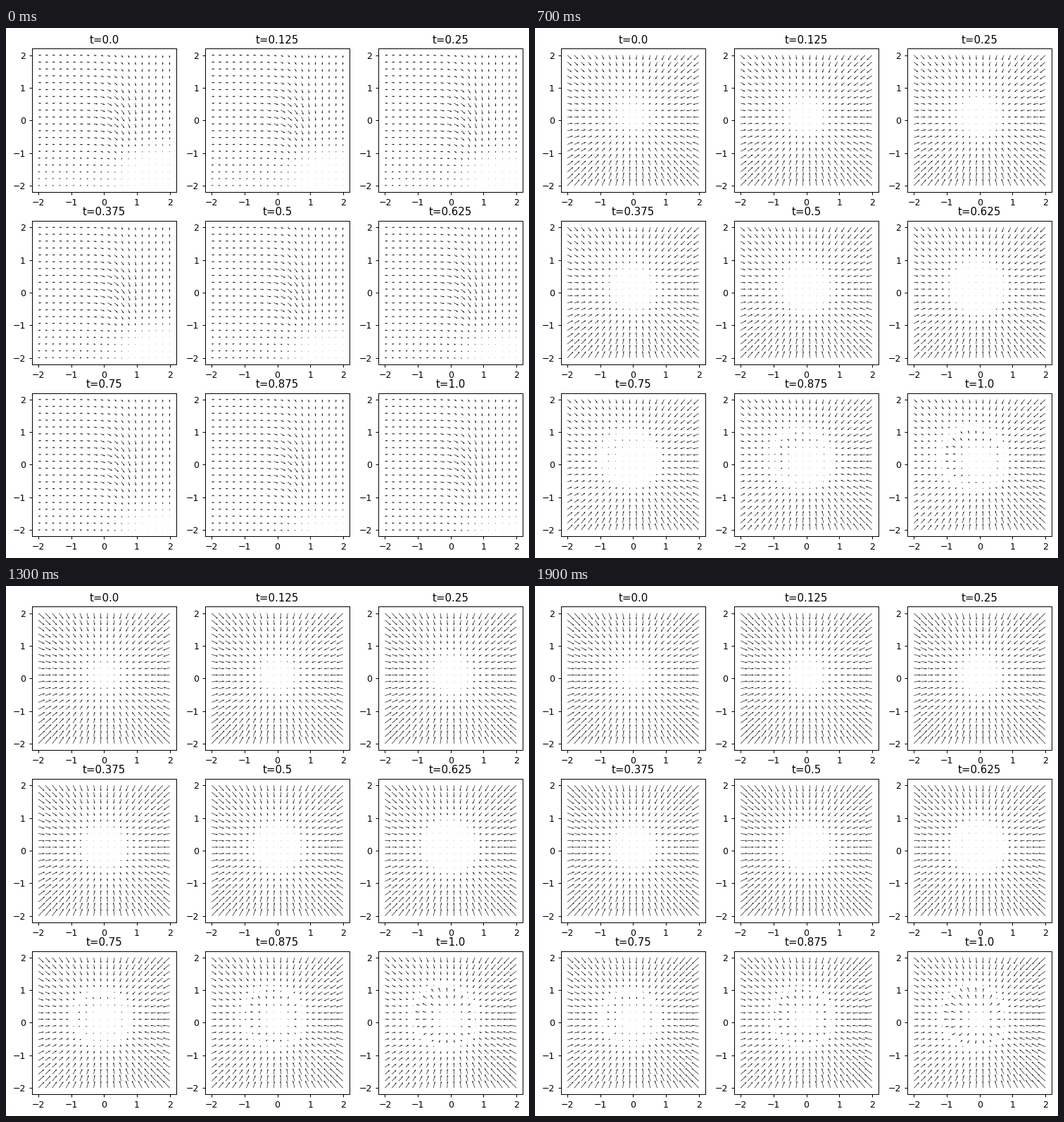
A matplotlib script that plays this animation: 743x753 px, repeating every 2 s.

```python
import numpy as np
import matplotlib.pyplot as plt
from matplotlib.animation import FuncAnimation

W, H, DPI = 743, 753, 90
FRAMES, INTERVAL = 20, 100
TIMES = np.arange(9) / 8
CENTER = (0.01, 0.1)

axis = np.linspace(-2, 2, 20)
X, Y = np.meshgrid(axis, axis)
DX, DY = X - CENTER[0], Y - CENTER[1]
R = np.hypot(DX, DY) + 1e-9
THETA = np.arctan2(DY, DX)


def sigmoid(z):
    return 1 / (1 + np.exp(-z))


def lobe(degrees, power=2):
    """Angular weight: 1 towards the given direction, 0 opposite to it."""
    return ((1 + np.cos(THETA - np.radians(degrees))) / 2) ** power


def start_field(t):
    """Untrained flow: rightwards on the left, bending down on the right."""
    angle = -np.radians(96) * sigmoid((X - 0.42) / 0.36)
    low = sigmoid((-1.2 - Y) / 0.25)
    angle += np.radians(14) * (1 - t) * low * sigmoid(-X / 0.4)
    size = 4.4 + 4 * np.exp(-((X - 0.35) ** 2 + 0.6 * (Y - 0.1) ** 2) / 0.7)
    size *= 1 - 0.45 * (1 - 0.7 * t) * low
    corner = sigmoid((X - 0.5) / 0.3) * sigmoid((-0.75 - 0.75 * t - Y) / 0.28)
    size *= 1 - 0.95 * corner
    return size * np.cos(angle), size * np.sin(angle)


def trained_field(t, i):
    """Inward flow outside a calm core; outward flow in the core when t > 0.5."""
    age = max(i - 3, 0)
    late = max(0.0, (t - 0.5) / 0.5)

    skew = 0.55 * np.exp(-age / 5)
    pull = 5.15 * R / (1 + 0.2 * np.exp(-age / 6) * R)
    pull *= 1 - skew * lobe(140)
    pull *= 1 + 0.35 * np.exp(-age / 5) * lobe(250)
    pull *= 1 - 0.33 * late * lobe(180)
    pull *= 1 + 0.12 * late * (1 - np.exp(-age / 6)) * lobe(-30)

    edge = 0.72 + late * (0.38 * lobe(150) - 0.02)
    if t <= 0.5:
        core = 0.72 * np.sqrt(t / 0.5)
        gate = sigmoid((R - core) / 0.16) if t > 0 else 1.0
    else:
        gate = sigmoid((R - edge - 0.12 * late) / 0.17)

    grown = 1 - np.exp(-age / 6)
    base = 0.22 + 0.65 * grown
    push = (7 + 5.5 * grown) * late * (base + (1 - base) * lobe(130))
    push = push * np.minimum(R / edge, 1) ** (3 - 1.6 * grown)
    push = push * sigmoid((edge - R) / 0.07)

    radial = push - pull * gate
    return radial * DX / R, radial * DY / R


def field(t, i):
    mix = np.exp(-(i / 1.4) ** 1.6)
    u0, v0 = start_field(t)
    u1, v1 = trained_field(t, i)
    return mix * u0 + (1 - mix) * u1, mix * v0 + (1 - mix) * v1


fig, axes = plt.subplots(3, 3, figsize=(W / DPI, H / DPI), dpi=DPI)
fig.subplots_adjust(left=36.75 / W, right=734.25 / W,
                    bottom=30.6 / H, top=723.6 / H,
                    wspace=0.2, hspace=0.2)

quivers = []
for ax, t in zip(axes.flat, TIMES):
    u, v = field(t, 0)
    quivers.append(ax.quiver(X, Y, u, v, width=0.003,
                             scale=1, scale_units="dots"))
    ax.set_xlim(-2.2, 2.2)
    ax.set_ylim(-2.2, 2.2)
    ax.set_xticks(range(-2, 3))
    ax.set_yticks(range(-2, 3))
    ax.set_title(f"t={t}")


def update(i):
    for q, t in zip(quivers, TIMES):
        q.set_UVC(*field(t, i))
    return quivers


anim = FuncAnimation(fig, update, frames=FRAMES, interval=INTERVAL,
                     init_func=lambda: update(0), repeat=True,
                     repeat_delay=0, blit=False)
plt.show()
```
